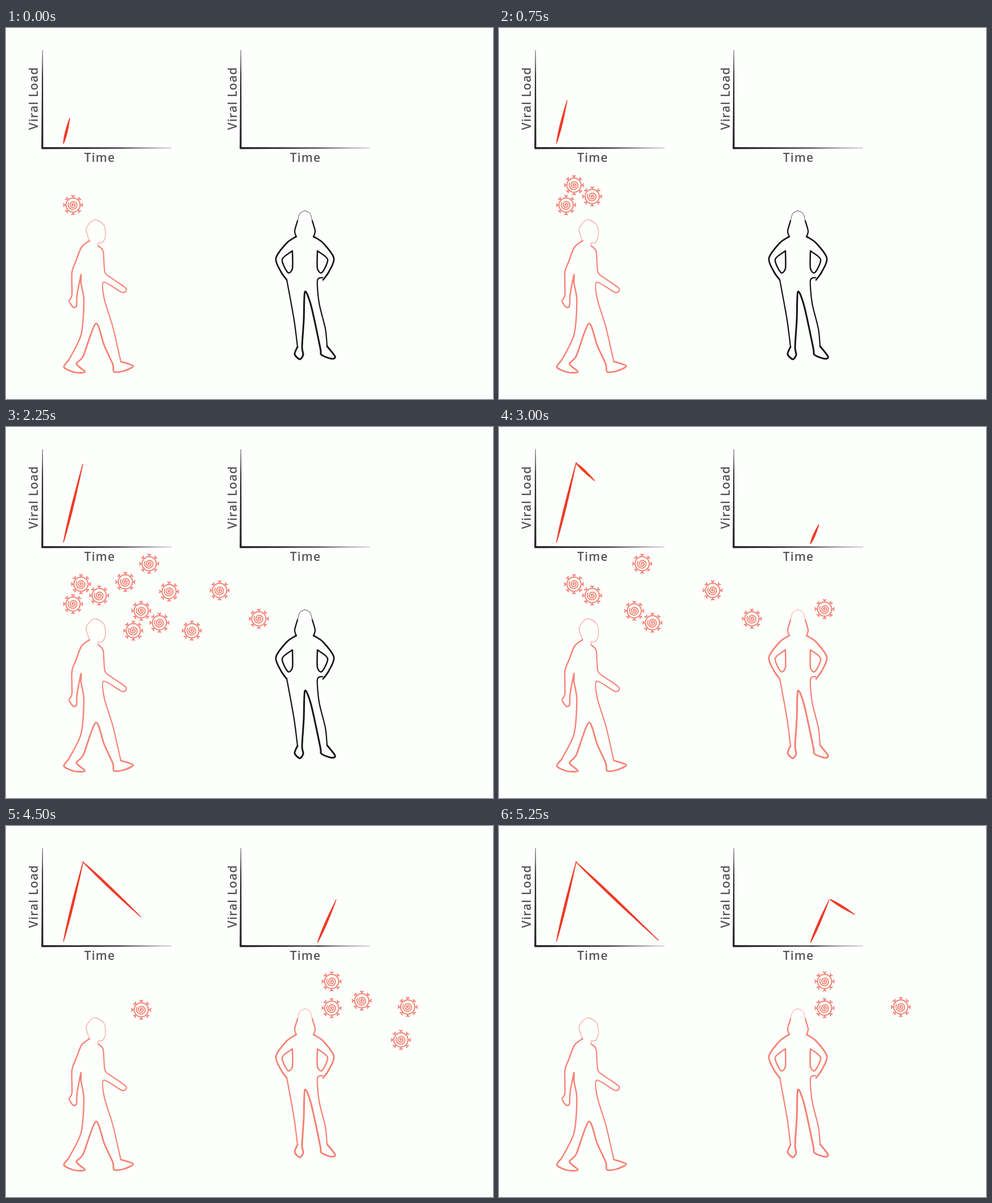
An HTML page that plays this animation: 857 px wide and 654 px high, repeating every 6 s.

```html
<!DOCTYPE html>
<html lang="en">
<head>
<meta charset="utf-8">
<title>Viral load over time</title>
<style>
  html, body { margin: 0; width: 100%; height: 100%; overflow: hidden; background: #fdfffd; }
  svg { display: block; width: 857px; height: 654px; }
  text { font: 600 21px "Open Sans", "Noto Sans", sans-serif; letter-spacing: 1.1px; fill: #555; text-anchor: middle; }
  .pen { fill: none; stroke-linecap: round; stroke-linejoin: round; }
  .coral { stroke: #f58273; }
  .red { fill: #ee3a25; }
  .infect { animation: infect 6s step-end infinite; }
  @keyframes infect { 0% { stroke: #151515; } 50%, 100% { stroke: #f58273; } }
</style>
</head>
<body>
<svg viewBox="0 0 857 654">
  <defs>
    <filter id="rough" filterUnits="userSpaceOnUse" x="0" y="0" width="857" height="654" color-interpolation-filters="sRGB">
      <feTurbulence type="fractalNoise" baseFrequency=".2" numOctaves="2" seed="4"/>
      <feDisplacementMap in="SourceGraphic" scale="1.4" xChannelSelector="R" yChannelSelector="G"/>
    </filter>
    <linearGradient id="fadeX">
      <stop offset=".6" stop-color="#222"/><stop offset="1" stop-color="#222" stop-opacity=".35"/>
    </linearGradient>
    <linearGradient id="fadeY" x2="0" y2="1">
      <stop offset="0" stop-color="#222" stop-opacity=".5"/><stop offset=".25" stop-color="#222"/>
    </linearGradient>
    <g id="axes" filter="url(#rough)">
      <path fill="url(#fadeY)" d="M63.6 39h1.4l.6 173h-3.4z"/>
      <path fill="url(#fadeX)" d="M62.5 210l229 1v1l-229 1.5z"/>
    </g>
    <g id="virus" class="pen coral"></g>
  </defs>
  <use href="#axes"/>
  <use href="#axes" x="349"/>
  <text transform="translate(55.5 124) rotate(-90)">Viral Load</text>
  <text transform="translate(405.5 124) rotate(-90)">Viral Load</text>
  <text x="165" y="236">Time</text>
  <text x="527" y="236">Time</text>
  <g id="curves" class="red" filter="url(#rough)"></g>
  <g id="swarm"></g>
  <g id="man" class="pen coral" filter="url(#rough)"></g>
  <g id="woman" class="pen infect" filter="url(#rough)"></g>
</svg>
<script>
const STEP = 750, STEPS = 8;
const $ = id => document.getElementById(id);

function add(parent, tag, attrs) {
  const el = document.createElementNS('http://www.w3.org/2000/svg', tag);
  for (const k in attrs) el.setAttribute(k, attrs[k]);
  return parent.appendChild(el);
}

// One keyframe rule per visible length, shifted by a negative delay
const sheet = document.head.appendChild(document.createElement('style')).sheet;
for (let n = 1; n < STEPS; n++) {
  sheet.insertRule(`@keyframes on${n} { 0% { visibility: visible } ${n * 100 / STEPS}%, 100% { visibility: hidden } }`);
}
function show(el, from, to) {
  el.style.animation = `on${to - from} ${STEP * STEPS}ms step-end ${(from - STEPS) * STEP}ms infinite`;
}

// Brush stroke whose width swells and tapers along its length
function brush([x0, y0], [x1, y1]) {
  const dx = x1 - x0, dy = y1 - y0, len = Math.hypot(dx, dy);
  const side = s => Array.from({ length: 11 }, (_, i) => {
    const t = i / 10, w = s * (.6 + 1.7 * Math.sin(Math.PI * t ** .8));
    return [x0 + dx * t - dy / len * w, y0 + dy * t + dx / len * w];
  });
  return 'M' + [...side(1), ...side(-1).reverse()].join('L') + 'z';
}
// Grows a stroke step by step; the last length stays to the end of the loop
function grow(a, b, start, reveal) {
  reveal.forEach((t, i) => {
    const tip = a.map((v, j) => v + (b[j] - v) * t);
    const last = i === reveal.length - 1;
    show(add($('curves'), 'path', { d: brush(a, tip) }), start + i, last ? STEPS : start + i + 1);
  });
}
grow([101, 204], [136, 62], 0, [.32, .54, .75, .98, 1]);
grow([135, 63], [281, 202], 4, [.23, .4, .7, 1]);
grow([548, 206], [581, 130], 4, [.45, .75, 1]);
grow([582, 129], [626, 156], 7, [1]);

// Virus: ring, spiral and eight capped spikes
const virus = $('virus');
add(virus, 'circle', { r: 12.5, 'stroke-width': 2 });
let coil = 'M0 0';
for (let a = .3; a < 16.5; a += .3) coil += `L${.54 * a * Math.cos(a)} ${.54 * a * Math.sin(a)}`;
add(virus, 'path', { d: coil, 'stroke-width': 1.8 });
for (let i = 0; i < 8; i++) {
  add(virus, 'path', { d: 'M-2.2-16.6L0-15.2L2.2-16.6M0-13V-15.2', 'stroke-width': 2.2, transform: `rotate(${i * 45})` });
}
// Grouped by the step of arrival: x, y, step of departure
const arrivals = [
  [[118, 312, 4]],
  [[132, 277, 6], [164, 297, 5]],
  [[210, 273, 4], [252, 241, 5], [287, 290, 4]],
  [[238, 324, 7], [224, 359, 4], [270, 345, 5], [327, 359, 4], [376, 288, 5], [445, 338, 6]],
  [[573, 321, 8]],
  [[573, 274, 8], [626, 308, 7]],
  [[707, 319, 8], [695, 377, 7]]
];
arrivals.forEach((group, from) => {
  for (const [x, y, to] of group) show(add($('swarm'), 'use', { href: '#virus', x, y }), from, to);
});

// Catmull-Rom spline through "x,y x,y ...", optionally mirrored about x = mid
function draw(id, width, text, opacity = 1, mid = 0) {
  const p = text.split(' ').map(s => s.split(',').map(Number));
  if (mid) for (const q of p) q[0] = 2 * mid - q[0];
  const at = i => p[Math.max(0, Math.min(p.length - 1, i))];
  const ctrl = (i, s) => at(i).map((v, j) => v + s * (at(i + 1)[j] - at(i - 1)[j]) / 7);
  let d = 'M' + p[0];
  for (let i = 1; i < p.length; i++) d += `C${ctrl(i - 1, 1)} ${ctrl(i, -1)} ${p[i]}`;
  add($(id), 'path', { d, 'stroke-width': width, 'stroke-opacity': opacity });
}

// Walking man: head, back and arm, legs, front and arm
draw('man', 1.2, '147,375 141,354 155,338 172,347 175,366 170,378 162,379 163,385', .75);
draw('man', 2.4, '147,375 133,386 123,411 116,431 116,471 111,481 118,492 124,490 125,471 132,435 132,450 137,481 132,541 110,586');
draw('man', 2.8, '110,586 102,598 121,607 139,606 124,592 136,578 158,521 173,560 188,593 190,606 206,605 224,596 202,588');
draw('man', 2.1, '202,588 188,527 173,478 172,448 204,466 211,459 186,441 174,430 171,394 162,384');

// Standing woman: the upper body is symmetric
for (const mid of [0, 526]) {
  draw('woman', 1, '513,340 517,327 526,322', .75, mid);
  draw('woman', 2.3, '513,340 508,358 511,368', 1, mid);
  draw('woman', 2.8, '510,368 494,379 475,406 484,430 494,444', 1, mid);
  draw('woman', 2.5, '504,393 486,408 496,431 504,424 504,393', 1, mid);
}
draw('woman', 2.2, '494,444 496,454 507,515 513,562');
draw('woman', 3, '513,562 508,575 517,584 523,576 521,562 524,515 526,465 537,490 553,564 555,576 573,583 579,579 565,561');
draw('woman', 2.2, '565,561 562,530 551,485 548,445 557,440');
</script>
</body>
</html>
```
